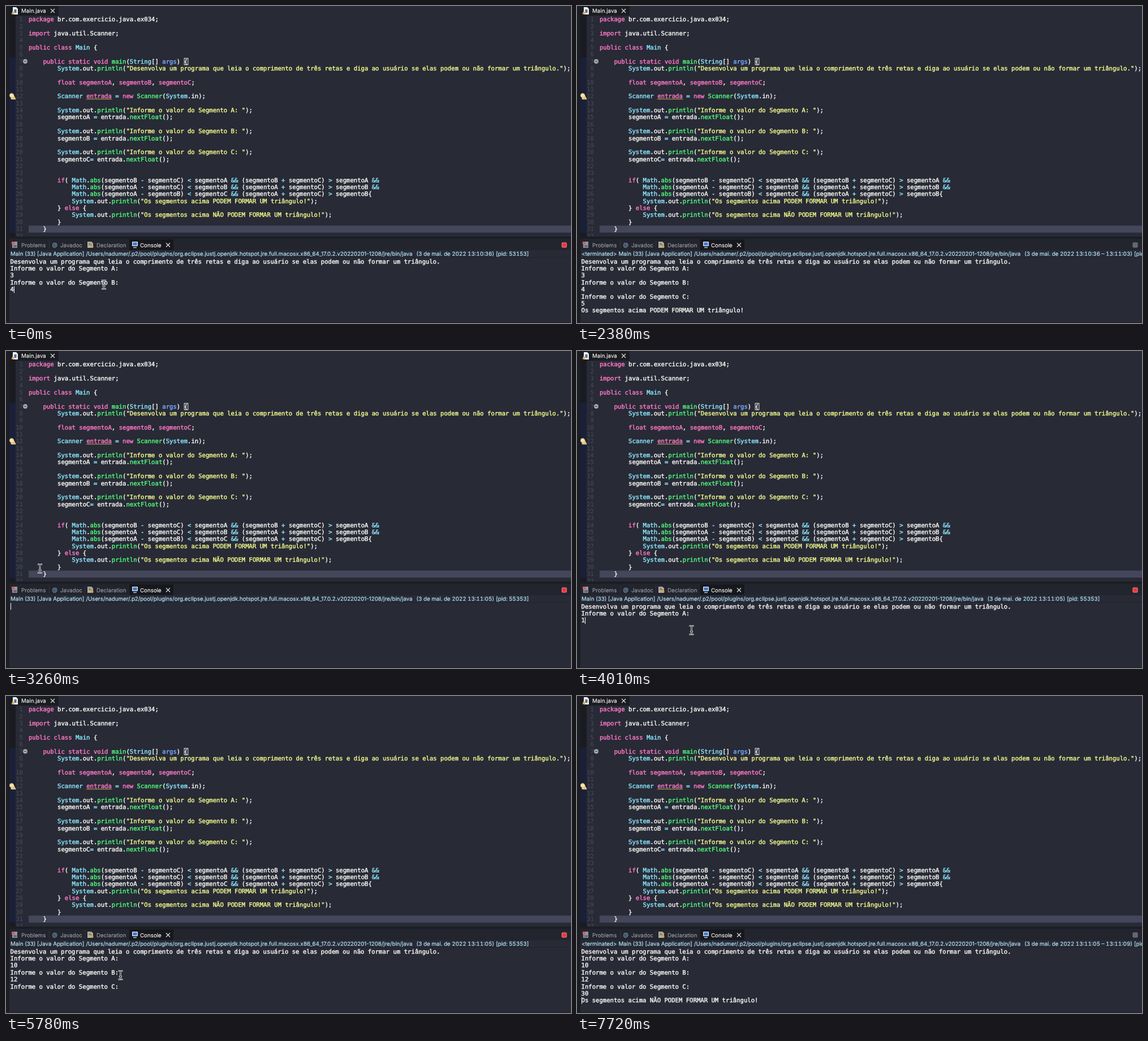
Animation, 999 px wide and 561 px high, one loop 8000 ms. Source, as an HTML page:

```html
<!DOCTYPE html>
<html lang="pt">
<head>
<meta charset="utf-8">
<title>Console</title>
<style>
  html, body { margin: 0; width: 100%; height: 100%; overflow: hidden; background: #1c1d25; }
  svg { display: block; width: 999px; height: 561px; }
  text { white-space: pre; text-rendering: geometricPrecision; color: #f8f8f2; }
  text, tspan { fill: currentColor; stroke: currentColor; }
  .mono { font: 10.61px "DejaVu Sans Mono", monospace; stroke-width: .42; }
  .ui { font: 9.75px Inter, sans-serif; stroke-width: .12; }
  .num { color: #464959; text-anchor: end; stroke-width: .1; }
  .kw { color: #ff79c6; }
  .type, .op { color: #8be9fd; }
  .fn { color: #50fa7b; }
  .str { color: #f1fa8c; }
  .arg { color: #79abff; }
  .dim { color: #9a9ca6; }
  .head { color: #b4e6f6; stroke-width: .2; }
  #date { font-variant-numeric: tabular-nums; }
  .x { stroke: #e4e4e6; stroke-width: 1.1; fill: none; }
</style>
</head>
<body>
<svg viewBox="0 0 999 561">
  <defs>
    <path id="bar" d="M-3-7.5Q0-7.5 0-5.5V5.5Q0 7.5-3 7.5M3-7.5Q0-7.5 0-5.5M0 5.5Q0 7.5 3 7.5M-1.5 2.5h3"/>
  </defs>

  <!-- editor -->
  <rect x="6" width="993" height="408" fill="#282a36"/>
  <rect x="6" width="87" height="17" fill="#1b1c22"/>
  <rect x="6" y="17" width="11" height="391" fill="#1a1b21"/>
  <rect x="6" y="91.5" width="11" height="310" fill="#1a2038"/>
  <rect x="40" y="388.6" width="959" height="12.4" fill="#44475a"/>
  <path d="M12 2h6l3 3v10h-9z" fill="#f4f4ee"/>
  <rect x="14.5" y="6" width="4" height="6" fill="#456fa8"/>
  <path d="M12 8l3.500 6.500h-6z" fill="#e9b04a"/>
  <text class="ui" x="27" y="12.3">Main.java</text>
  <path class="x" d="M79 5l7 7m0-7l-7 7"/>
  <g id="code"></g>
  <circle cx="34" cy="98" r="3.9" fill="#a9abb3"/>
  <path d="M32 98h4" stroke="#282a36"/>
  <rect x="315.2" y="92.5" width="6.6" height="11.5" fill="none" stroke="#e8e8e4"/>
  <path id="squiggle" fill="none" stroke="#e5c34f"/>
  <circle cx="10" cy="158.3" r="3.7" fill="#f6e3b0" stroke="#d9a94c" stroke-width=".7"/>
  <rect x="8.5" y="161.8" width="3" height="3.2" fill="#c9c2b4"/>
  <path d="M13.5 157.5l3.700 7.500h-7.400z" fill="#f2c258" stroke="#fff3cf" stroke-width=".6"/>

  <!-- console -->
  <rect y="408" width="999" height="153" fill="#1c1d25"/>
  <rect x="6" y="412" width="993" height="20" fill="#22242e"/>
  <rect x="6" y="432" width="993" height="128" fill="#282a36"/>
  <rect x="6" y="444.5" width="993" height="1" fill="#20222b"/>
  <rect x="218" y="413" width="78" height="19" fill="#17181d"/>
  <path d="M76.5 415v14M139.5 415v14" stroke="#30323d"/>
  <path d="M11 417h9v11h-9z" fill="#8f97a8"/>
  <path d="M10 417h5v5h-5z" fill="#d0605c"/>
  <path d="M13 424h6m-6 2h6" stroke="#3a3e4a"/>
  <text class="ui" x="81.5" y="426.2" style="color:#87a9c8">@</text>
  <path d="M144 417h7l3 3v8h-10z" fill="#b3b09d"/>
  <path d="M146 420h4m-4 2.5h6" stroke="#555a63"/>
  <circle cx="152" cy="425.5" r="2.5" fill="#d0a451"/>
  <rect x="223" y="417" width="10" height="8" rx="1" fill="#dce9fa"/>
  <rect x="224.3" y="418.3" width="7.4" height="5.4" fill="#3f78c9"/>
  <path d="M225 427.5h6" stroke="#b9c6d8" stroke-width="1.5"/>
  <text class="ui dim" x="27" y="426.5">Problems</text>
  <text class="ui dim" x="96" y="426.5">Javadoc</text>
  <text class="ui dim" x="160" y="426.5">Declaration</text>
  <text class="ui" x="237" y="426.5">Console</text>
  <path class="x" d="M283 419.5l7 7m0-7l-7 7"/>
  <rect id="stop" x="983" y="419" width="8" height="8" rx="1"/>
  <text id="ended" class="ui head" x="8" y="441.5">&lt;terminated&gt;</text>
  <g id="head">
    <text class="ui head" x="8" y="441.5">Main (33) [Java Application]</text>
    <text class="ui head" x="141.5" y="441.5">/Users/nadumer/.p2/pool/plugins/org.eclipse.justj.openjdk.hotspot.jre.full.macosx.x86_64_17.0.2.v20220201-1208/jre/bin/java</text>
    <text id="date" class="ui head" x="725.5" y="441.5"></text>
  </g>
  <g id="log"></g>
  <rect id="caret" width="1" height="12" fill="#f8f8f2"/>

  <!-- pointers -->
  <g id="beam" fill="none" stroke-linecap="round">
    <use href="#bar" stroke="#f4f4f4" stroke-width="2.4"/>
    <use href="#bar" stroke="#15161b" stroke-width=".9"/>
  </g>
  <path id="arrow" d="M0 0V11.5L2.7 9L4.6 13.3L6.6 12.4L4.8 8.3H8.4Z" fill="#08080a" stroke="#f6f6f6"/>
</svg>
<script>
const $ = id => document.getElementById(id);
const PITCH = 12.36, CHAR = 6.39, LOOP = 8000;
const INTRO = 'Desenvolva um programa que leia o comprimento de três retas e diga ao usuário se elas podem ou não formar um triângulo.';
const ask = s => `Informe o valor do Segmento ${s}:`;
const result = s => `Os segmentos acima ${s} UM triângulo!`;
const print = s => `System.out.println("${s}");`;
const read = (s, gap = ' ') => [
  '        ' + print(ask(s) + ' '),
  `        segmento${s}${gap}= entrada.nextFloat();`, ''];
const test = names => 'Math.abs(0 - 1) < 2 && (3 + 4) > 5'
  .replace(/\d/g, i => 'segmento' + names[i]);

const source = [
  'package br.com.exercicio.java.ex034;', '',
  'import java.util.Scanner;', '',
  'public class Main {', '',
  '    public static void main(String[] args) {',
  '        ' + print(INTRO), '',
  '        float segmentoA, segmentoB, segmentoC;', '',
  '        Scanner entrada = new Scanner(System.in);', '',
  ...read('A'), ...read('B'), ...read('C', ''), '',
  '        if( ' + test('BCABCA') + ' &&',
  '            ' + test('ACBACB') + ' &&',
  '            ' + test('ABCACB') + '{',
  '            ' + print(result('PODEM FORMAR')),
  '        } else {',
  '            ' + print(result('NÃO PODEM FORMAR')),
  '        }', '    }', ''];

const token = new RegExp([
  '(?<str>"[^"]*")',
  '(?<kw>\\b(?:package|import|public|class|static|void|float|new|if|else)\\b|(?<=float .*)segmento\\w|entrada(?= =))',
  '(?<type>\\b(?:String|Main|Math|System)\\b|(?<!\\.)Scanner(?= ))',
  '(?<fn>\\w+(?=\\())',
  '(?<arg>\\bargs\\b)',
  '(?<op>[-+=<>&]+)'].join('|'), 'g');
const esc = s => s.replace(/&/g, '&amp;').replace(/</g, '&lt;');

function paint(line) {
  let html = '', end = 0;
  for (const m of line.matchAll(token)) {
    const kind = Object.keys(m.groups).find(k => m.groups[k]);
    html += esc(line.slice(end, m.index)) + `<tspan class="${kind}">${esc(m[0])}</tspan>`;
    end = m.index + m[0].length;
  }
  return html + esc(line.slice(end));
}

$('code').innerHTML = source.map((line, i) => {
  const y = (27.4 + PITCH * i).toFixed(2);
  const indent = line.search(/\S|$/);
  return `<text class="mono num" x="30" y="${y}">${i + 1}</text>` +
    `<text class="mono" x="${39.9 + indent * CHAR}" y="${y}">${paint(line.trim())}</text>`;
}).join('');
$('squiggle').setAttribute('d', 'M142 165.5' + 'l1.5-1.5l1.5 1.5'.repeat(15));

const [A, B, C] = ['A', 'B', 'C'].map(ask);
const first = [INTRO, A, '3', B, '4'];
const second = [INTRO, A, '10', B, '12', C];
const run1 = '13:10:36', run2 = '13:11:05';
const head = (from, pid, to) => `(3 de mai. de 2022 ${from}${to ? ' – ' + to : ''}) [pid: ${pid}]`;

// Each step changes part of the state; caret is [column, row].
const steps = [
  [0, { log: first, caret: [1, 4], mouse: ['beam', 173, 493], ended: false, date: head(run1, 53153) }],
  [150, { caret: [0, 5] }],
  [290, { log: [...first, C] }],
  [590, { log: [...first, C, '5'], caret: [1, 6] }],
  [730, { log: [...first, C, '5', result('PODEM FORMAR')], caret: [0, 7], ended: true, date: head(run1, 53153, '13:11:03') }],
  [1330, { caret: null, mouse: ['arrow', 90, 417] }],
  [1480, { mouse: null }],
  [1780, { caret: [0, 7] }],
  [2380, { caret: null }],
  [2970, { log: [], caret: [0, 0], mouse: ['arrow', 6, 302], ended: false, date: head(run2, 55353) }],
  [3120, { mouse: ['beam', 60, 385] }],
  [3270, { log: [INTRO, A], mouse: ['beam', 130, 452] }],
  [3420, { mouse: ['beam', 180, 486] }],
  [3560, { caret: null, mouse: ['beam', 198, 493] }],
  [3710, { mouse: ['beam', 202.5, 494] }],
  [4010, { log: [INTRO, A, '1'], caret: [1, 2] }],
  [4150, { log: second.slice(0, 3), caret: [2, 2] }],
  [4450, { caret: [0, 3] }],
  [4600, { log: second.slice(0, 4) }],
  [4750, { log: [...second.slice(0, 4), '1'], caret: [1, 4] }],
  [4890, { log: second.slice(0, 5), caret: [2, 4] }],
  [5040, { caret: [0, 5] }],
  [5190, { log: second }],
  [5780, { caret: null }],
  [6230, { log: [...second, '3'], caret: [1, 6] }],
  [6370, { log: [...second, '30'], caret: [2, 6] }],
  [6520, { caret: [0, 7], ended: true, date: head(run2, 55353, '13:11:09') }],
  [6670, { log: [...second, '30', result('NÃO PODEM FORMAR')] }],
  [7120, { caret: null }],
  [7570, { caret: [0, 7], mouse: ['arrow', 7, 293] }],
  [7720, { mouse: null }]];

const show = (id, on) => $(id).style.display = on ? '' : 'none';

function render({ log, caret, mouse, ended, date }) {
  $('log').innerHTML = log.map((s, i) =>
    `<text class="mono" x="7.5" y="${(455.7 + PITCH * i).toFixed(2)}">${s}</text>`).join('');
  show('caret', caret);
  if (caret) {
    $('caret').setAttribute('x', 8 + Math.floor(caret[0] * CHAR));
    $('caret').setAttribute('y', Math.round(446.4 + caret[1] * PITCH));
  }
  for (const id of ['beam', 'arrow']) {
    const on = mouse && mouse[0] === id;
    show(id, on);
    if (on) $(id).setAttribute('transform', `translate(${mouse[1]} ${mouse[2]})`);
  }
  show('ended', ended);
  $('head').setAttribute('transform', `translate(${ended ? 65.5 : 0})`);
  $('date').textContent = date;
  $('stop').setAttribute('fill', ended ? '#62646f' : '#f0343c');
  $('stop').setAttribute('stroke', ended ? '#777983' : '#ff8b8b');
}

const start = performance.now();
let shown = -1;
function tick() {
  const t = (performance.now() - start) % LOOP;
  const past = steps.filter(([at]) => at <= t);
  if (past.length !== shown) {
    shown = past.length;
    render(Object.assign({}, ...past.map(step => step[1])));
  }
  requestAnimationFrame(tick);
}
tick();
</script>
</body>
</html>
```
